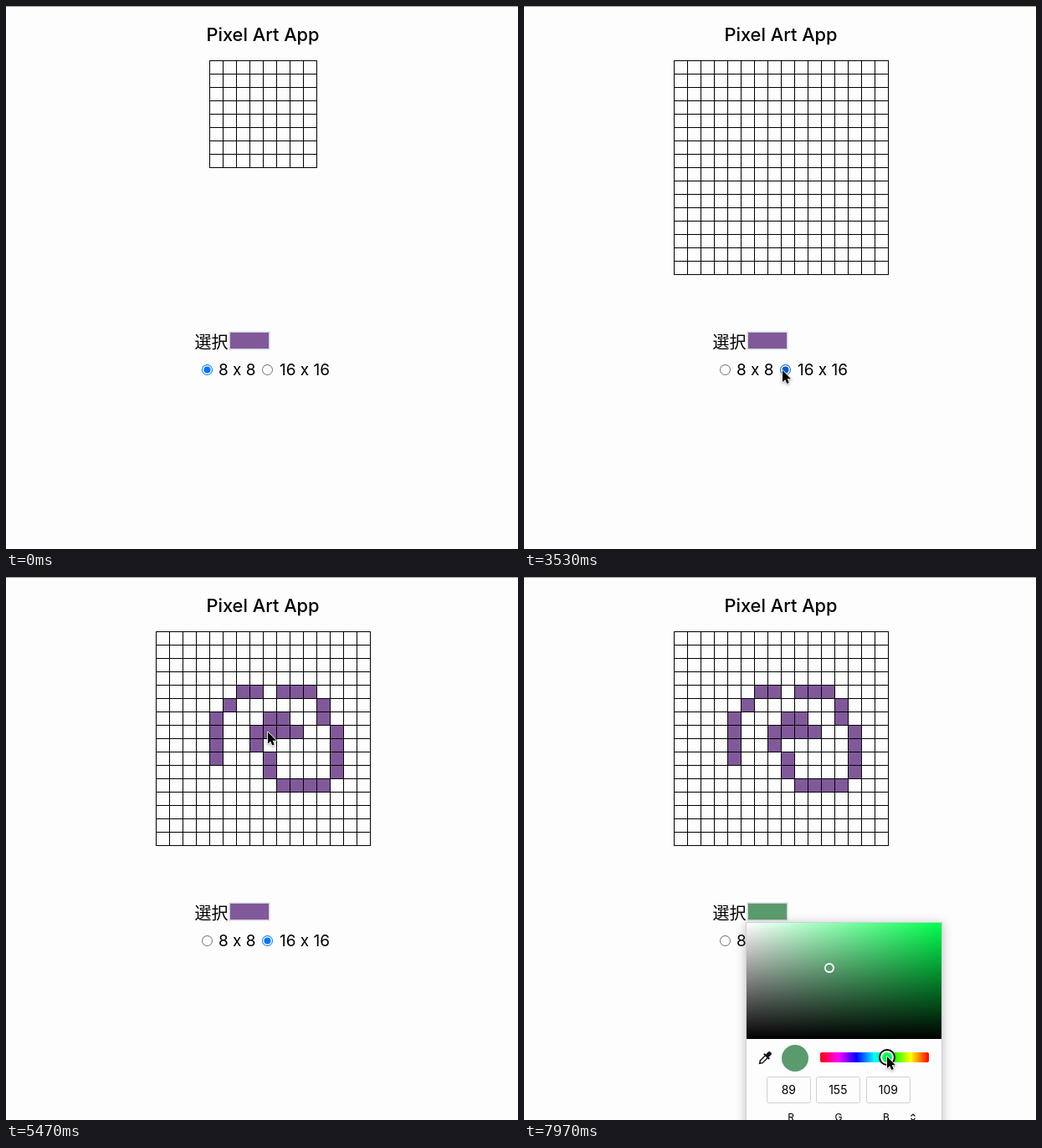
These frames come from a looping animation (612x650 px, 8000 ms). An HTML page with a canvas:

```html
<!DOCTYPE html>
<html lang="ja">
<head>
<meta charset="utf-8">
<title>Pixel Art App</title>
<style>
html, body { margin: 0; width: 100%; height: 100%; overflow: hidden; background: #fdfdfd; }
canvas { display: block; width: 612px; height: 650px; }
</style>
</head>
<body>
<canvas id="stage" width="612" height="650"></canvas>
<script>
const ctx = document.getElementById('stage').getContext('2d');
const LOOP = 8000, CELL = 16, TOP = 65, MID = 307, LEFT = MID - 8 * CELL;
const PAPER = '#fdfdfd', EDGE = '#d0d0d4';
const FONT = 'Inter, "Noto Sans CJK JP", "Noto Sans CJK", sans-serif';
const HUE = 276.4, SAT = 0.426, VAL = 155 / 255;
const BAR = { x: 354, y: 569, w: 130, h: 12 };
const FIELD = { x: 266, y: 414, w: 233, h: 139 };

const mix = (a, b, k) => a + (b - a) * k;
const mixPoint = (a, b, k) => [mix(a[0], b[0], k), mix(a[1], b[1], k)];
const clamp01 = v => Math.min(1, Math.max(0, v));
const smooth = k => k * k * (3 - 2 * k);

// Corners of the two drawn curves, in cells; the pen skips a cell between them
const curves = [
  [[4, 9], [4, 6], [6, 4], [7, 4]],
  [[9, 4], [11, 4], [13, 7], [13, 10], [12, 11], [9, 11], [7, 8], [7, 7], [8, 6], [9, 6], [10, 7], [8, 7]]
];

// Every cell on a curve, one step at a time
function walk(corners) {
  const cells = [corners[0]];
  for (let i = 1; i < corners.length; i++) {
    const a = corners[i - 1], b = corners[i];
    const n = Math.max(Math.abs(b[0] - a[0]), Math.abs(b[1] - a[1]));
    for (let s = 1; s <= n; s++) cells.push(mixPoint(a, b, s / n).map(Math.round));
  }
  return cells;
}
const stroke = curves.flatMap(walk);

// The pen slows down for the inner part
const paintTime = i => 4206 + i * 34 + Math.max(0, i - 19) * 16;
const strokeStart = paintTime(0), strokeEnd = paintTime(stroke.length - 1);
const penAt = ([c, r]) => [LEFT + c * CELL + 6, TOP + r * CELL + 8];

const radio8 = [239, 436], radio16 = [309, 436];
const moves = [
  { at: 470, len: 780, to: radio16 },
  { at: 1900, len: 580, to: radio8 },
  { at: 2790, len: 280, to: radio16 },
  { at: 3710, len: 200, to: [262, 222] },
  { at: 4110, len: strokeStart - 4110, to: penAt(stroke[0]) },
  { at: strokeEnd, len: 0, to: penAt(stroke.at(-1)) },
  { at: 5450, len: 750, to: [298, 402] },
  { at: 6620, len: 650, to: [451, 585] },
  { at: 7400, len: 500, to: [434, 574] }
];

function pointer(t) {
  if (t < 30) return null;
  if (t >= strokeStart && t < strokeEnd) {
    const i = stroke.findIndex((c, n) => paintTime(n + 1) > t);
    const k = (t - paintTime(i)) / (paintTime(i + 1) - paintTime(i));
    return mixPoint(penAt(stroke[i]), penAt(stroke[i + 1]), k);
  }
  let p = [86, 366];
  for (const { at, len, to } of moves) {
    if (t < at) break;
    p = mixPoint(p, to, len ? smooth(clamp01((t - at) / len)) : 1);
  }
  return p;
}

function hsv(h, s, v) {
  return [5, 3, 1].map(n => {
    const k = (n + h / 60) % 6;
    return Math.round(255 * v * (1 - s * clamp01(Math.min(k, 4 - k))));
  });
}
const css = rgb => `rgb(${rgb.join()})`;

function rect(x, y, w, h, fill) {
  ctx.fillStyle = fill;
  ctx.fillRect(x, y, w, h);
}

function disc(x, y, r, fill) {
  ctx.beginPath();
  ctx.arc(x, y, r, 0, Math.PI * 2);
  ctx.fillStyle = fill;
  ctx.fill();
}

function box(x, y, w, h, r) {
  ctx.beginPath();
  ctx.roundRect(x, y, w, h, r);
}

function line(points, width) {
  ctx.beginPath();
  points.forEach(([x, y]) => ctx.lineTo(x, y));
  ctx.lineWidth = width;
  ctx.strokeStyle = '#111';
  ctx.stroke();
}

function text(str, x, y, size, align = 'left', weight = 400) {
  ctx.font = `${weight} ${size}px ${FONT}`;
  ctx.textAlign = align;
  ctx.fillStyle = '#000';
  ctx.fillText(str, x, y);
}

function grid(n, painted, color) {
  const left = MID - n * CELL / 2, size = n * CELL + 1;
  for (const [c, r] of painted) rect(left + c * CELL, TOP + r * CELL, CELL, CELL, color);
  for (let i = 0; i <= n; i++) {
    rect(left + i * CELL, TOP, 1, size, '#000');
    rect(left, TOP + i * CELL, size, 1, '#000');
  }
}

function radio(x, on, p) {
  const y = 435.5;
  const hover = p && Math.hypot(p[0] - x, p[1] - y) < 7;
  const blue = hover ? '#005cc8' : '#0075ff';
  disc(x, y, 6.5, on ? blue : hover ? '#4f4f4f' : '#767676');
  disc(x, y, 5.5, PAPER);
  if (on) disc(x, y, 4, blue);
}

function knob(x, y, r, focused, fill) {
  if (focused) disc(x, y, r + 2, '#000');
  disc(x, y, r, '#fff');
  disc(x, y, r - 2, fill);
}

function dropper() {
  ctx.save();
  ctx.translate(288, 576);
  ctx.rotate(Math.PI / 4);
  ctx.fillStyle = '#111';
  box(-2.5, -10, 5, 7, 2.2);
  ctx.fill();
  ctx.fillRect(-4.5, -4, 9, 2);
  line([[-2, -2], [-2, 6], [0, 9], [2, 6], [2, -2]], 1.5);
  ctx.restore();
}

function field(hue) {
  const { x, y, w, h } = FIELD;
  const fade = (dx, dy, from, to) => {
    const g = ctx.createLinearGradient(x, y, x + dx, y + dy);
    g.addColorStop(0, from);
    g.addColorStop(1, to);
    rect(x, y, w, h, g);
  };
  fade(w, 0, '#fff', css(hsv(hue, 1, 1)));
  fade(0, h, 'rgba(0,0,0,0)', '#000');
}

function hueBar() {
  const { x, y, w, h } = BAR;
  const g = ctx.createLinearGradient(x, 0, x + w, 0);
  for (let i = 0; i <= 6; i++) g.addColorStop(i / 6, css(hsv(360 - i * 60, 1, 1)));
  box(x, y, w, h, 2);
  ctx.fillStyle = g;
  ctx.fill();
}

function picker(hue, rgb, dragging) {
  ctx.save();
  ctx.shadowColor = 'rgba(90,90,110,.4)';
  ctx.shadowBlur = 12;
  ctx.shadowOffsetY = 2;
  rect(265, 413, 235, 260, EDGE);
  ctx.restore();
  rect(266, 414, 233, 260, PAPER);

  const color = css(rgb);
  field(hue);
  knob(365, 468, 6, !dragging, color);
  dropper();
  disc(324, 576, 16, color);
  hueBar();
  knob(BAR.x + BAR.w * (1 - hue / 360), 575, 8, dragging, css(hsv(hue, 1, 1)));

  rgb.forEach((v, i) => {
    const x = Math.round(290 + i * 59.3);
    box(x + 0.5, 598.5, 52, 31, 2);
    ctx.lineWidth = 1;
    ctx.strokeStyle = EDGE;
    ctx.stroke();
    text(v, x + 26.3, 619, 14, 'center');
    text('RGB'[i], 319 + i * 57, 651, 12, 'center');
  });
  for (const [tip, base] of [[643, 645.5], [650.5, 648]])
    line([[462.5, base], [465, tip], [467.5, base]], 1.2);
}

function arrow([x, y]) {
  ctx.save();
  ctx.translate(x, y);
  ctx.beginPath();
  [[0, 0], [0, 14], [3.2, 11.2], [5.4, 16], [7.8, 15], [5.7, 10.3], [10, 10.3]]
    .forEach(([px, py]) => ctx.lineTo(px, py));
  ctx.closePath();
  ctx.lineJoin = 'round';
  ctx.lineWidth = 1.6;
  ctx.strokeStyle = '#fff';
  ctx.shadowColor = 'rgba(0,0,0,.4)';
  ctx.shadowBlur = 3;
  ctx.shadowOffsetY = 1;
  ctx.stroke();
  ctx.shadowColor = 'transparent';
  ctx.fillStyle = '#000';
  ctx.fill();
  ctx.restore();
}

function draw(t) {
  const p = pointer(t);
  const large = (t >= 1560 && t < 2680) || t >= 3400;
  const open = t >= 6480, dragging = t >= 7470;
  const hue = dragging ? 360 * (1 - (p[0] - BAR.x) / BAR.w) : HUE;
  const rgb = hsv(hue, SAT, VAL);

  rect(0, 0, 612, 650, PAPER);
  rect(0, 0, 612, 1, '#a0a0a0');
  text('Pixel Art App', MID, 42, 21.8, 'center', 500);
  grid(large ? 16 : 8, stroke.filter((c, i) => t >= paintTime(i)), css(hsv(HUE, SAT, VAL)));

  text('選択', 225.5, 409.5, 20);
  rect(266, 389, 50, 23, '#ececf0');
  rect(267, 390, 48, 21, EDGE);
  rect(268, 391, 46, 19, css(rgb));

  radio(240.5, !large, p);
  text('8 x 8', 254, 442, 19);
  radio(312.5, large, p);
  text('16 x 16', 327, 442, 19);

  if (open) picker(hue, rgb, dragging);
  if (p) arrow(p);
}

const start = performance.now();
function tick() {
  draw((performance.now() - start) % LOOP);
  requestAnimationFrame(tick);
}
tick();
</script>
</body>
</html>
```
